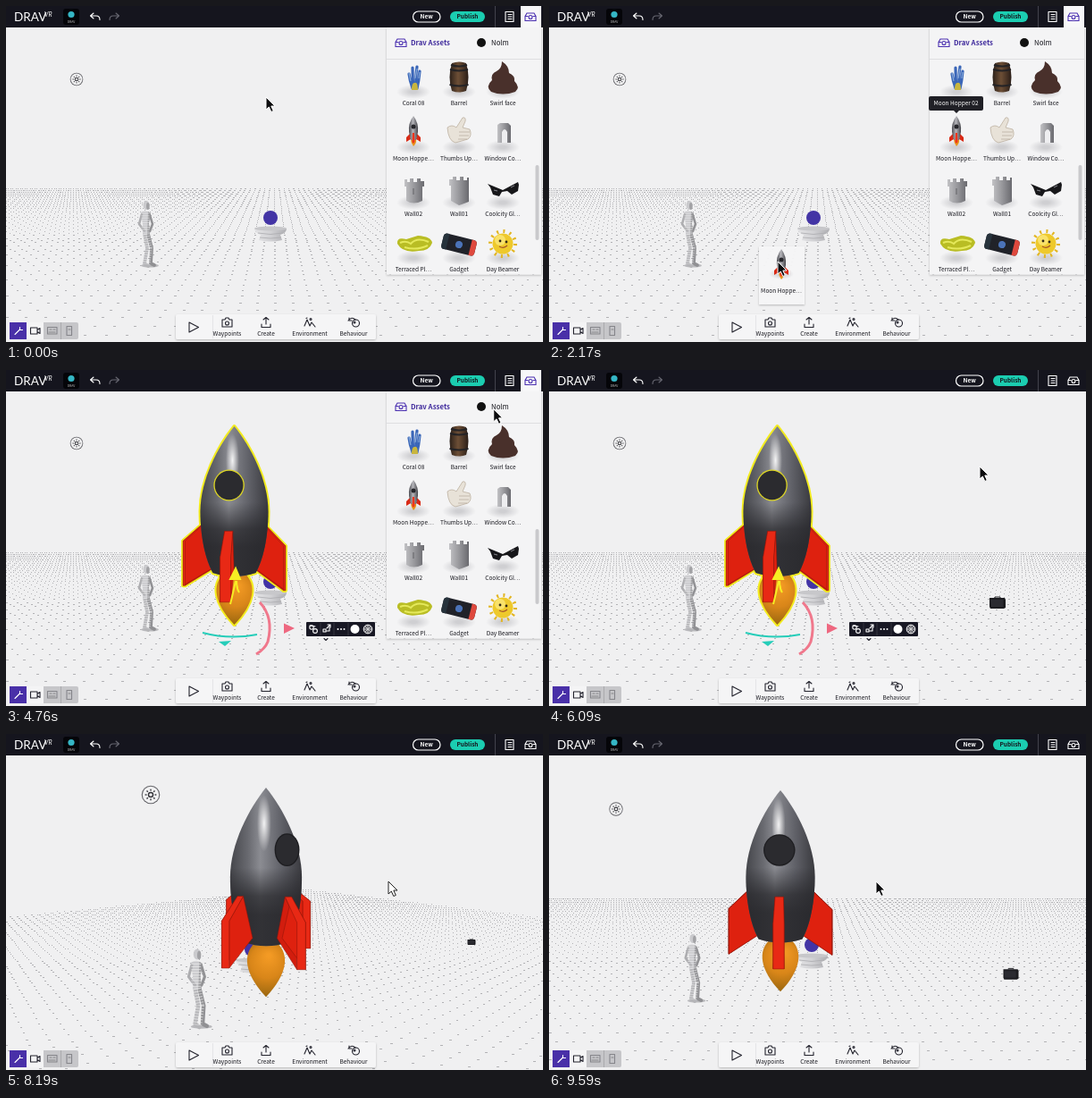
These frames come from a looping animation (601x376 px, 9660 ms). An HTML page with a canvas:

```html
<!DOCTYPE html>
<html lang="en">
<head>
<meta charset="utf-8">
<title>Scene editor</title>
<style>
  html, body { margin: 0; width: 100%; height: 100%; overflow: hidden; background: #f0f0f1; }
  canvas, svg { position: absolute; left: 0; top: 0; width: 601px; height: 376px; display: block; }
  text { font: 500 6.5px "Noto Sans CJK JP", "Noto Sans CJK SC", "Noto Sans", sans-serif; fill: #15151c; }
  .mid { text-anchor: middle; }
  .bold { font-weight: 700; }
  .line { fill: none; stroke: #22222c; stroke-width: 1.1; stroke-linecap: round; stroke-linejoin: round; }
  .light { stroke: #fff; }
</style>
</head>
<body>
<canvas id="scene" width="601" height="376"></canvas>
<svg viewBox="0 0 601 376">
  <defs>
    <radialGradient id="shade"><stop offset=".2" stop-color="#cfcfd2"/><stop offset="1" stop-color="#cfcfd2" stop-opacity="0"/></radialGradient>
    <linearGradient id="stone"><stop stop-color="#c2c2c5"/><stop offset=".45" stop-color="#9c9ca0"/><stop offset="1" stop-color="#6a6a6f"/></linearGradient>
    <linearGradient id="wood"><stop stop-color="#2c211a"/><stop offset=".45" stop-color="#6d4f36"/><stop offset="1" stop-color="#2a1e18"/></linearGradient>
    <linearGradient id="steel"><stop stop-color="#4a4a50"/><stop offset=".45" stop-color="#b5b5ba"/><stop offset="1" stop-color="#434348"/></linearGradient>
    <filter id="soft" x="-20%" y="-20%" width="140%" height="140%"><feDropShadow dx="0" dy="1" stdDeviation="1.2" flood-opacity=".25"/></filter>
    <g id="case" fill="none" stroke="currentColor" stroke-width="1.1">
      <path d="M-6-.5H-2.500M2.500-.5H6V4.500H-6V-.5L-4-4H4L6-.5"/><circle cy=".5" r="2"/>
    </g>
    <g id="hopper">
      <path d="M-4 4-8 8V13L-3 10ZM4 4 8 8V13L3 10Z" fill="#d92a16"/>
      <path d="M-3 10Q-3 14 0 18Q4 14 3 10Z" fill="#e8951c"/>
      <path d="M0-16Q6-8 5 2L3 11H-3L-5 2Q-6-8 0-16Z" fill="url(#steel)"/>
      <circle cy="-4" r="2.500" fill="#26262b"/>
      <path d="M-1 3H1L1.500 13 0 15-1.500 13Z" fill="#ee351d"/>
    </g>
  </defs>

  <!-- rocket handles and context bar -->
  <g id="handles">
    <path d="M257 222 251 234H262ZM257 236Q254 250 251 262M258 236Q258 245 261 249" fill="#f7ee23" stroke="#f7ee23" stroke-width="2"/>
    <path d="M284 260Q300 277 293 304 290 312 280 318" fill="none" stroke="#f0788c" stroke-width="3"/>
    <path d="M311 283.500 323 289 311 295Z" fill="#ee6880"/>
    <path d="M220 294Q250 302 281 296" fill="none" stroke="#25cdb9" stroke-width="2"/>
    <path d="M238 304 252 303 245 309Z" fill="#25cdb9"/>
    <rect x="336" y="282" width="77" height="16" rx="1" fill="#181824"/>
    <path d="M352 283V297M367 283V297M383 283V297" stroke="#34343f"/>
    <g class="line light"><circle cx="342" cy="288" r="2.200"/><circle cx="346" cy="292" r="2.400"/><path d="M340 286 346 287M355 293V290H358V293ZM359 289 363 285M360 285H363V288M362 288V292H359"/></g>
    <g fill="#fff"><circle cx="371.500" cy="290" r="1"/><circle cx="375" cy="290" r="1"/><circle cx="378.500" cy="290" r="1"/><circle cx="390.500" cy="290" r="5"/></g>
    <circle cx="405" cy="290" r="4.800" fill="#55555e" stroke="#fff"/>
    <path d="M402 287 408 293M408 287 402 293M405 285V295M400 290H410" stroke="#ddd" stroke-width=".8"/>
    <path class="line" d="M356 300.500 358 302.500 360 300.500" stroke-width=".7"/>
  </g>

  <!-- asset panel -->
  <g id="panel">
    <rect x="426" y="24" width="173" height="276.500" fill="#f4f4f5" filter="url(#soft)"/>
    <path d="M426 59.500H599" stroke="#dedee1"/>
    <use href="#case" x="442" y="41" color="#4a2fb0"/>
    <text x="453" y="44" class="bold" style="font-size:7.800px;fill:#3f2a9c">Drav Assets</text>
    <circle cx="532" cy="41" r="5" fill="#111"/>
    <text x="543" y="44" style="font-size:7.800px">Nolm</text>
    <rect x="592.500" y="178" width="4" height="84" rx="2" fill="#c9c9cc"/>
    <g id="items"></g>
    <g transform="translate(457 81)">
      <path d="M-2 11Q-5 3-6-5M-1 11Q-2 0-2-12M2 11Q1 0 3-13M3 11Q5 3 6-8" fill="none" stroke="#3a66b8" stroke-width="3.200" stroke-linecap="round"/>
      <path d="M-4 3-6-6M1 0 3-11M5 0 6-7" stroke="#86a9d8" stroke-width="1.200"/>
      <path d="M-3 13Q-3 5 0 5Q4 3 4 13Z" fill="#c9b63e"/>
    </g>
    <g transform="translate(507 80)">
      <path d="M-8-16Q0-19 8-16Q13 0 8 15Q0 18-8 15Q-13 0-8-16Z" fill="url(#wood)"/>
      <path d="M-10-9Q0-6 10-9M-10.500 8Q0 11 10.500 8M-9-14Q0-11 9-14" fill="none" stroke="#242326" stroke-width="2"/>
    </g>
    <path d="M555 62Q563 67 563 75 570 78 569 84 576 91 570 96 556 101 543 96 536 90 544 83 542 76 549 73Q555 70 555 62Z" fill="#49302b"/>
    <use href="#hopper" x="456" y="139"/>
    <path d="M494 136Q499 132 504 136L511 125Q515 124 514 129L511 136 519 138Q522 145 517 149L503 153Q495 151 494 136Z" fill="#e8e2d8" stroke="#b7aa99" stroke-width=".7"/>
    <path d="M507 141H519M507 145H518M506 149H516" stroke="#b5aa9c" stroke-width=".7"/>
    <path d="M550 153V133L553 131H562L565 134V153Z" fill="url(#stone)"/><path d="M555 153V141Q558 135 561 141V153Z" fill="#eeeef0"/>
    <path d="M446 194H449V197H452V193H456V197H460V193H464V196H468V202H466V218Q456 223 448 218V202H446Z" fill="url(#stone)"/>
    <path d="M496 194H500V191H504V195H508V191H512V195H516V192H518V219L507 223 498 218V201H496Z" fill="url(#stone)"/>
    <path d="M456 204V211" stroke="#606065"/>
    <path d="M539 199 556 206 573 197 574 200 573 207 566 211 561 207 555 208 552 213 545 211 542 203Z" fill="#17171a"/><path d="M546 206 550 207M565 203 569 201" stroke="#85858c"/>
    <path d="M438 266Q437 258 448 261L461 257Q476 258 477 265 474 274 462 274 444 277 438 266Z" fill="#b9bd24"/>
    <path d="M441 265Q448 262 453 266 460 258 473 264M446 270Q460 274 472 268" fill="none" stroke="#e5e95b" stroke-width="2"/>
    <g transform="translate(507 267) rotate(14)">
      <rect x="-19" y="-9" width="38" height="18" rx="4" fill="#202229"/>
      <path d="M-13-9H-15Q-19-9-19-5V5Q-19 9-15 9H-13Z" fill="#27333c"/><path d="M13-9H15Q19-9 19-5V5Q19 9 15 9H13Z" fill="#df493e"/>
      <circle r="4" fill="#4b73b8"/>
    </g>
    <g transform="translate(556 266)">
      <circle r="14" fill="none" stroke="#e2b521" stroke-width="4" stroke-dasharray="2 5.330"/>
      <circle r="11.500" fill="#eec92c"/><circle cx="-3" cy="-4" r="6" fill="#f9e26a"/>
      <circle cx="-3" cy="-3" r="1.400" fill="#342a17"/><circle cx="4" cy="-2" r="1.400" fill="#342a17"/>
      <path d="M-4 3Q1 6 5 2" fill="none" stroke="#a5542b" stroke-width="1.200"/>
    </g>
  </g>
  <g id="tip">
    <path d="M427 101H484Q486 101 486 103V115Q486 117 484 117H459L456 120 453 117H427Q425 117 425 115V103Q425 101 427 101Z" fill="#202026"/>
    <text x="455.500" y="111.300" class="mid" style="fill:#fff">Moon Hopper 02</text>
  </g>

  <!-- top bar -->
  <rect width="601" height="24" fill="#15151e"/>
  <text x="9" y="16.500" style="font:400 13.500px Lato,sans-serif;fill:#fff">DRAV</text>
  <text x="43" y="11.500" style="font:italic 7px Lato,sans-serif;fill:#fff">VR</text>
  <rect x="64" y="3" width="18" height="18" rx="3" fill="#050509"/><circle cx="73" cy="9.500" r="3.600" fill="#35b6c5"/>
  <text x="73" y="18.500" class="mid" style="font-size:3.500px;fill:#bbb">DRAV</text>
  <path class="line light" d="M98 8 94.500 11 98 14M95 11H101Q105 11 105 15.500"/>
  <path class="line" style="stroke:#666670" d="M123 8 126.500 11 123 14M126 11H120Q116 11 116 15.500"/>
  <rect x="455.500" y="6" width="30.500" height="12" rx="6" fill="none" stroke="#fff" stroke-width="1.200"/>
  <text x="470.700" y="14.300" class="mid bold" style="fill:#fff">New</text>
  <rect x="497" y="6" width="39" height="12" rx="6" fill="#1bcdb1"/>
  <text x="516.500" y="14.300" class="mid bold">Publish</text>
  <path d="M547.500 0V24" stroke="#42424c"/>
  <path class="line light" d="M559 6.500H568V17.500H559ZM562 9.500H566M562 12H566M562 14.500H566"/>
  <rect id="tab" x="576" width="23" height="24" fill="#f7f7f8"/>
  <use id="tabIcon" href="#case" x="587" y="12"/>

  <!-- bottom bars -->
  <g filter="url(#soft)"><rect x="190" y="345" width="224" height="28" rx="2" fill="#f5f5f6"/></g>
  <path d="M231.500 346V372" stroke="#e4e4e7"/>
  <g class="line">
    <path d="M205 354V365L215.500 359.500Z"/>
    <path d="M242 351H245L246 349H249L250 351H253V359H242Z"/><circle cx="247.500" cy="355" r="2"/>
    <path d="M286 356V359.500H296V356M291 356V348.500M288 351 291 348.500 294 351"/>
    <path d="M334 358 337 351 340 358 342 354 346 359M336 349.500 337 349"/><circle cx="341" cy="350.500" r="1"/>
    <path d="M383 352Q387 347 391 351M384 349V352H387"/><circle cx="391.500" cy="355" r="4"/><circle cx="390" cy="354" r="1"/>
  </g>
  <g class="mid"><text x="247.500" y="369">Waypoints</text><text x="291" y="369">Create</text><text x="340" y="369">Environment</text><text x="389" y="369">Behaviour</text></g>
  <rect x="4" y="354" width="77" height="19" rx="2" fill="#c6c6c9"/>
  <path d="M4 354H23V373H4Z" fill="#4930a8"/><path d="M23 354H42V373H23Z" fill="#f4f4f5"/>
  <path d="M61.500 354V373" stroke="#a9a9ad"/>
  <path class="line light" d="M10 367.500 15.500 362" stroke-width="2"/><path class="line light" d="M15.500 359.500V362.500H18.500" stroke-width="1.800"/>
  <path class="line" d="M27.500 360H35V367H27.500ZM35 362.500 38 360.500V366.500L35 364.500"/>
  <path class="line" style="stroke:#85858a" d="M46.500 359.500H57V367H46.500ZM49 362H51M53 362H55M48 365H55M68 358.500H73.500V368.500H68ZM70 362H72"/>
  <g id="toast">
    <rect x="430" y="345" width="70" height="31" fill="#14141e"/>
    <text x="445" y="364" class="bold" style="font-size:7.500px;fill:#fff">Saved!</text>
    <path class="line" style="stroke:#25d0b6" d="M473.500 356H482L484.500 358.500V367H473.500ZM476 356V360H481V356M476 367V363H482V367"/>
  </g>

  <g id="card">
    <rect x="-21" y="-17" width="51" height="65" fill="#f6f6f7" opacity=".94" filter="url(#soft)"/>
    <ellipse cx="4" cy="14" rx="14" ry="6" fill="url(#shade)"/>
    <use href="#hopper" x="4" y="2"/>
    <text x="4" y="35" class="mid">Moon Hoppe…</text>
  </g>
  <path id="cursor" d="M0 0V14L3.300 11 5.800 16.500 8.300 15.400 5.800 10H10Z" stroke-linejoin="round"/>
</svg>
<script>
const LOOP = 9660, STEP = 70, RAD = Math.PI / 180;
const byId = id => document.getElementById(id);
const ctx = byId('scene').getContext('2d');

const labels = ['Coral 08', 'Barrel', 'Swirl face', 'Moon Hoppe…', 'Thumbs Up…', 'Window Co…',
  'Wall02', 'Wall01', 'Coolcity Gl…', 'Terraced Pl…', 'Gadget', 'Day Beamer'];
byId('items').innerHTML = labels.map((label, i) => {
  const x = [456, 507, 556][i % 3], y = 111 + 62 * Math.floor(i / 3);
  return `<ellipse cx="${x}" cy="${y - 15}" rx="19" ry="8" fill="url(#shade)"/><text x="${x}" y="${y}" class="mid">${label}</text>`;
}).join('');

const pointer = [
  [0, 291, 102], [200, 291, 102], [900, 452, 142], [1250, 452, 142], [2170, 256, 286], [2500, 256, 286],
  [3290, 256, 280], [3900, 256, 280], [5000, 586, 11], [5350, 586, 11], [6090, 482, 108], [6700, 354, 165],
  [7000, 354, 165], [7490, 387, 165], [8190, 428, 165], [9300, 366, 165]
];
// time; rocket x, top, scale, turn; grid yaw, horizon, height; figure x, y, scale; lamp x, y, r; box x, y, w; pot x, y
const poses = [
  [7000, 255.500, 63, 1, -10, 0, 156, 1, 157, 291, 1, 79, 82, 7.300, 502, 261, 18, 296, 237],
  [7490, 265.500, 62, 1.030, 11.500, 20, 127, 1.180, 169, 308, 1.070, 83, 79, 8.300, 531, 258, 14, 293, 235],
  [8190, 291, 60, 1.055, 41, 40, 126, 1.260, 214, 328, 1.200, 162, 68, 10.300, 521, 233, 9, 275, 241],
  [9300, 259, 63, 1.015, -2, 0, 123, 1.260, 161, 299, 1.030, 75, 84, 7.700, 517, 269, 17, 294, 236]
];

// Monotone cubic interpolation through timed rows
function track(keys, t) {
  const last = keys.length - 1;
  if (t <= keys[0][0]) return keys[0].slice(1);
  if (t >= keys[last][0]) return keys[last].slice(1);
  const i = keys.findIndex(k => k[0] > t) - 1;
  const rate = (n, c) => (keys[n + 1][c] - keys[n][c]) / (keys[n + 1][0] - keys[n][0]);
  const slope = (n, c) => {
    if (n === 0 || n === last) return 0;
    const a = rate(n - 1, c), b = rate(n, c);
    return a * b > 0 ? 2 * a * b / (a + b) : 0;
  };
  const [p, q] = [keys[i], keys[i + 1]], span = q[0] - p[0], u = (t - p[0]) / span, v = 1 - u;
  return p.slice(1).map((from, n) => {
    const c = n + 1;
    return v * v * (1 + 2 * u) * from + u * u * (3 - 2 * u) * q[c] +
      span * u * v * (v * slope(i, c) - u * slope(i + 1, c));
  });
}

function place(x, y, scale, draw) {
  ctx.save();
  ctx.translate(x, y);
  ctx.scale(scale, scale);
  draw();
  ctx.restore();
}
function fill(path, color) {
  ctx.fillStyle = color;
  ctx.fill(path instanceof Path2D ? path : new Path2D(path));
}
function ellipse(x, y, rx, ry, color) {
  const path = new Path2D();
  path.ellipse(x, y, rx, ry, 0, 0, 7);
  fill(path, color);
}
function stroke(d, color, width) {
  ctx.strokeStyle = color;
  ctx.lineWidth = width;
  ctx.stroke(new Path2D(d));
}
function gradient(box, ...stops) {
  const g = box.length === 4 ? ctx.createLinearGradient(...box) : ctx.createRadialGradient(...box);
  stops.forEach(([at, color]) => g.addColorStop(at, color));
  return g;
}

function drawGrid(yaw, horizon, height) {
  const half = 56, pivot = 28, c = Math.cos(yaw * RAD), s = Math.sin(yaw * RAD);
  ctx.fillStyle = '#b2b2b5';
  ctx.beginPath();
  for (let i = -half; i <= half; i++) for (let j = -half; j <= half; j++) {
    const z = pivot + j * c + i * s;
    if (z < 15) continue;
    const x = 300 + 450 * (i * c - j * s) / z;
    const y = horizon + 4032 * height / z;
    if (x < -4 || x > 605 || y > 378) continue;
    ctx.rect(Math.round(x), 2 * Math.round(y / 2), Math.max(1, Math.round(60 / z)), 1);
  }
  ctx.fill();
}

function drawFigure() {
  ellipse(4, -.5, 10, 2, '#b9b9bc');
  ctx.lineCap = ctx.lineJoin = 'round';
  stroke('M2-36 6-20 5-3 9-1', '#919194', 3.8);
  stroke('M-2-36 1-20-2-3 2 0', '#b5b5b8', 3.8);
  fill('M-6-60Q0-64 5-59L3-48 4-35H-4L-4-46Z', '#c9c9cc');
  fill('M2-61 5-59 3-48 4-35H1Z', '#9b9b9e');
  stroke('M-5-58-8-47-2-39', '#adadb0', 2.6);
  stroke('M4-57 7-47 4-39', '#929295', 2.6);
  ellipse(0, -68, 3.5, 5, '#cacacd');
  ellipse(1.8, -67, 1.8, 4, '#a2a2a5');
  ctx.lineCap = 'butt';
  ctx.setLineDash([1, 1.6]);
  stroke('M-1-62-1-36 2-20 0-2', 'rgba(240,240,241,.6)', 9);
}

function drawPot() {
  fill('M-18 12Q-18 17-11 19L-13 25Q0 28 13 25L11 19Q18 17 18 12Z', gradient([-18, 0, 18, 0], [0, '#e4e4e6'], [.5, '#d2d2d5'], [1, '#aeaeb2']));
  ellipse(0, 12, 18, 2.6, '#c7c7ca');
  stroke('M-14 17Q0 20 14 17M-12 22Q0 24 12 22', '#ababaf', .8);
  ellipse(0, 0, 8, 8, '#4334a5');
}

function finParts(angle) {
  const s = Math.sin(angle), c = Math.cos(angle);
  const outline = [[36, 111], [57, 131], [57, 181], [22, 158]];
  const at = ([r, y], side) => `${r * s + side * (2 + r / 14) * c},${y + 16 * c * (r / 57) ** 2}`;
  const face = side => new Path2D('M' + outline.map(p => at(p, side)).join('L') + 'Z');
  const rim = new Path2D('M' + [...outline.slice(0, 3).map(p => at(p, -1)),
    ...outline.slice(0, 3).reverse().map(p => at(p, 1))].join('L') + 'Z');
  return [[face(-1), '#d21d0e'], [face(1), '#de210f'], [rim, '#e82915']];
}

function drawRocket(turn, selected) {
  const psi = turn * RAD;
  const fins = [2, -1, 1, 0].map(k => psi + k * Math.PI / 2);
  const isFront = a => Math.cos(a) > .3;
  const back = fins.filter(a => !isFront(a)).flatMap(finParts);
  const front = fins.filter(isFront).flatMap(finParts);
  const flame = new Path2D('M-12 165C-25 177-23 198 0 222C23 198 25 177 12 165Z');
  const body = new Path2D('M0 0C18 22 38 60 38 95C38 125 32 150 24 164Q0 172-24 164C-32 150-38 125-38 95C-38 60-18 22 0 0Z');
  const paint = ([path, color]) => {
    fill(path, color);
    ctx.strokeStyle = '#8c150b';
    ctx.lineWidth = .5;
    ctx.stroke(path);
  };
  if (selected) {
    ctx.strokeStyle = '#f3ec1e';
    ctx.lineWidth = 4;
    ctx.lineJoin = 'round';
    [...back, ...front, [flame], [body]].forEach(([path]) => ctx.stroke(path));
  }
  back.forEach(paint);
  fill(flame, gradient([3, 178, 2, 0, 190, 34], [0, '#f39a24'], [.5, '#d98619'], [1, '#94640f']));
  fill(body, gradient([-38, 0, 38, 0], [0, '#45464b'], [.25, '#696a70'], [.42, '#8b8c92'], [.7, '#62636a'], [1, '#3a3a3f']));
  fill(body, gradient([0, 85, 0, 135], [0, 'rgba(40,40,44,0)'], [.6, 'rgba(40,40,44,.75)'], [1, 'rgba(40,40,44,.9)']));
  ctx.save();
  ctx.clip(body);
  ctx.scale(.25, 1);
  ellipse(-8, 38, 30, 30, gradient([-8, 38, 0, -8, 38, 30], [0, 'rgba(255,255,255,.9)'], [1, 'rgba(255,255,255,0)']));
  ctx.restore();
  const wx = 34 * Math.sin(psi), wr = 17.5 * Math.cos(psi);
  ellipse(wx, 66, wr, 17.5, selected ? '#ddd624' : '#1d1d20');
  ellipse(wx, 66, wr - 1.3, 16.2, '#2b2b2f');
  front.forEach(paint);
}

function drawLamp(x, y, r) {
  place(x, y, r / 7.3, () => {
    ellipse(0, 0, 7.3, 7.3, '#66666b');
    ellipse(0, 0, 6.5, 6.5, '#f1f1f2');
    for (let k = 0; k < 8; k++) {
      ctx.rotate(Math.PI / 4);
      stroke('M3.200 0H4.500', '#333338', 1);
    }
    ellipse(0, 0, 2.3, 2.3, '#333338');
    ellipse(0, 0, 1.3, 1.3, '#f1f1f2');
  });
}

function drawBox(x, y, w) {
  place(x, y, w / 18, () => {
    fill('M-9-6H8L9-4V5L7 6H-8L-9 4Z', '#1c1c20');
    fill('M-8-4H6V4H-7Z', '#2a2a30');
    stroke('M-3-6V-7H3V-6', '#1c1c20', 1);
  });
}

function show(id, visible) {
  byId(id).style.display = visible ? '' : 'none';
}

function render(now) {
  const t = Math.floor(now % LOOP / STEP) * STEP;
  const within = (from, to) => t >= from && t < to;
  const [rx, ry, rs, turn, yaw, horizon, height, fx, fy, fs, lx, ly, lr, bx, by, bw, px, py] = track(poses, t);
  const selected = within(2520, 6790), panelOpen = t < 5320, orbiting = within(7000, 9380);

  ctx.fillStyle = '#f0f0f1';
  ctx.fillRect(0, 0, 601, 376);
  drawGrid(yaw, horizon, height);
  drawLamp(lx, ly, lr);
  drawBox(bx, by, bw);
  place(px, py, 1, drawPot);
  place(fx, fy, fs, drawFigure);
  if (t >= 2520) place(rx, ry, rs, () => drawRocket(turn, selected));

  show('handles', selected);
  show('panel', panelOpen);
  show('tab', panelOpen);
  byId('tabIcon').style.color = panelOpen ? '#4a2fb0' : '#fff';
  show('tip', within(840, 2380));
  show('card', within(1330, 2450));
  show('toast', within(2940, 4480));

  const [cx, cy] = track(pointer, t);
  byId('card').setAttribute('transform', `translate(${cx} ${cy})`);
  const cursor = byId('cursor');
  cursor.setAttribute('transform', `translate(${cx} ${cy})`);
  cursor.setAttribute('fill', orbiting ? '#fff' : '#0c0c0e');
  cursor.setAttribute('stroke', orbiting ? '#222' : '#fff');
}

let start;
function tick(now) {
  start ??= now;
  render(now - start);
  requestAnimationFrame(tick);
}
requestAnimationFrame(tick);
</script>
</body>
</html>
```
